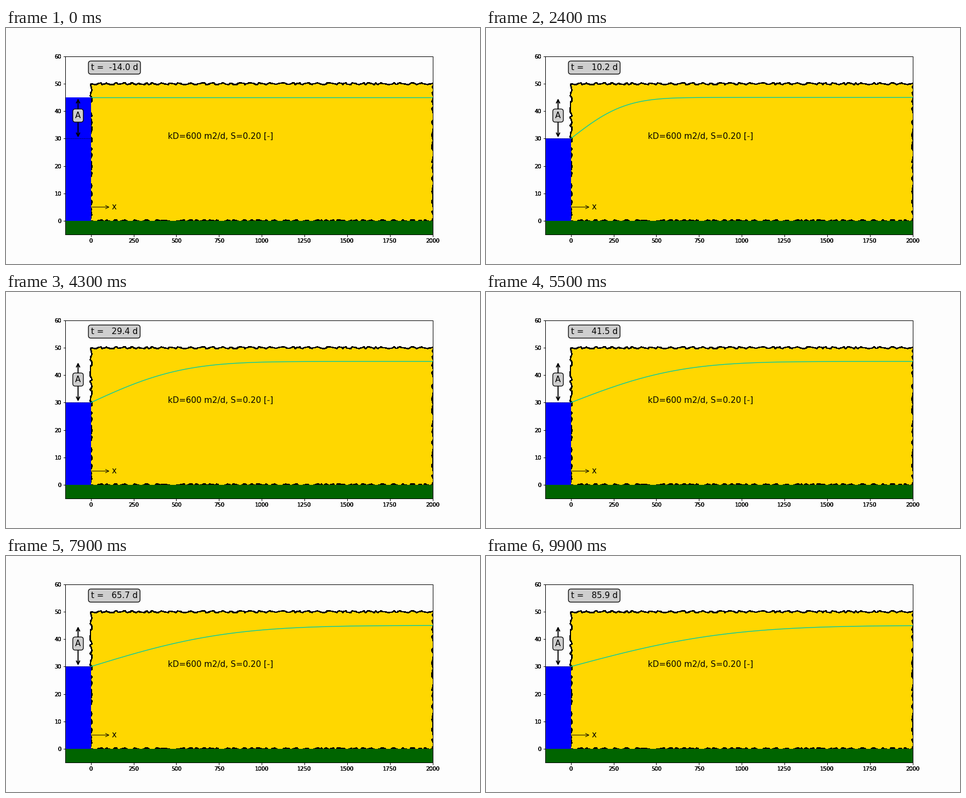
A matplotlib script for the animation above (10000 ms loop, 864 by 432 pixels).

```python
import math

import numpy as np
import matplotlib.pyplot as plt
from matplotlib.animation import FuncAnimation
from matplotlib.patches import Rectangle

KD, S = 600, 0.2
HIGH, LOW = 45, 30
FRAMES = 100
PAPER = "#fdfdfd"

times = np.linspace(-14, 85.9, FRAMES)
x = np.linspace(0, 2000, 401)
erf = np.vectorize(math.erf)

plt.rcParams.update({"font.family": "DejaVu Sans", "font.size": 10})
fig = plt.figure(figsize=(12, 6), dpi=72, facecolor=PAPER)


def add_axes(color):
    axes = fig.add_axes([0.125, 0.125, 0.775, 0.755], facecolor=color)
    axes.set(xlim=(-150, 2000), ylim=(-5, 60), xticks=range(0, 2001, 250))
    return axes


ax = add_axes(PAPER)
# Stacked transparent axes darken the tick labels.
for _ in range(3):
    add_axes("none").set_zorder(-1)
ax.set_zorder(-2)


def block(x0, y0, w, h, color, **kw):
    return ax.add_patch(Rectangle((x0, y0), w, h, fc=color, **kw))


def label(x0, y0, text, **kw):
    return ax.text(x0, y0, text, fontsize=15, zorder=6, **kw)


def arrow(start, end, style, **kw):
    props = dict(arrowstyle=style, mutation_scale=15, **kw)
    ax.annotate("", xy=end, xytext=start, arrowprops=props, zorder=5)


aquifer = block(0, 0, 2000, 50, "gold", ec="black", lw=1.5, aa=False, zorder=1)
aquifer.set_sketch_params(scale=1.5, length=50, randomness=16)
block(-150, -5, 2150, 5, "darkgreen", lw=0, zorder=2)
water = block(-150, 0, 150, HIGH, "blue", lw=0, zorder=2)
ax.plot([-150, 0], [LOW, LOW], "k:", lw=1, zorder=3)
head, = ax.plot(x, np.full_like(x, HIGH), color="#00cca6", lw=1.4, zorder=4)

box = dict(boxstyle="round", fc="#cecece", ec="black", lw=1.3)
arrow((-75, LOW), (-75, HIGH), "<->", lw=2)
label(-75, 37.5, "A", ha="center", bbox=box)
arrow((0, 5), (115, 5), "->", lw=1, shrinkA=0)
label(123, 5, "x", va="center")
label(450, 30, f"kD={KD} m2/d, S={S:.2f} [-]")
clock = label(0, 55, "", bbox=box)


def update(i):
    t = times[i]
    if t > 0:
        level = LOW
        h = LOW + (HIGH - LOW) * erf(x / math.sqrt(4 * KD * t / S))
    else:
        level = HIGH
        h = np.full_like(x, HIGH)
    water.set_height(level)
    head.set_ydata(h)
    clock.set_text(f"t = {t:6.1f} d")
    return water, head, clock


anim = FuncAnimation(fig, update, frames=FRAMES, interval=100, repeat=True)
plt.show()
```
